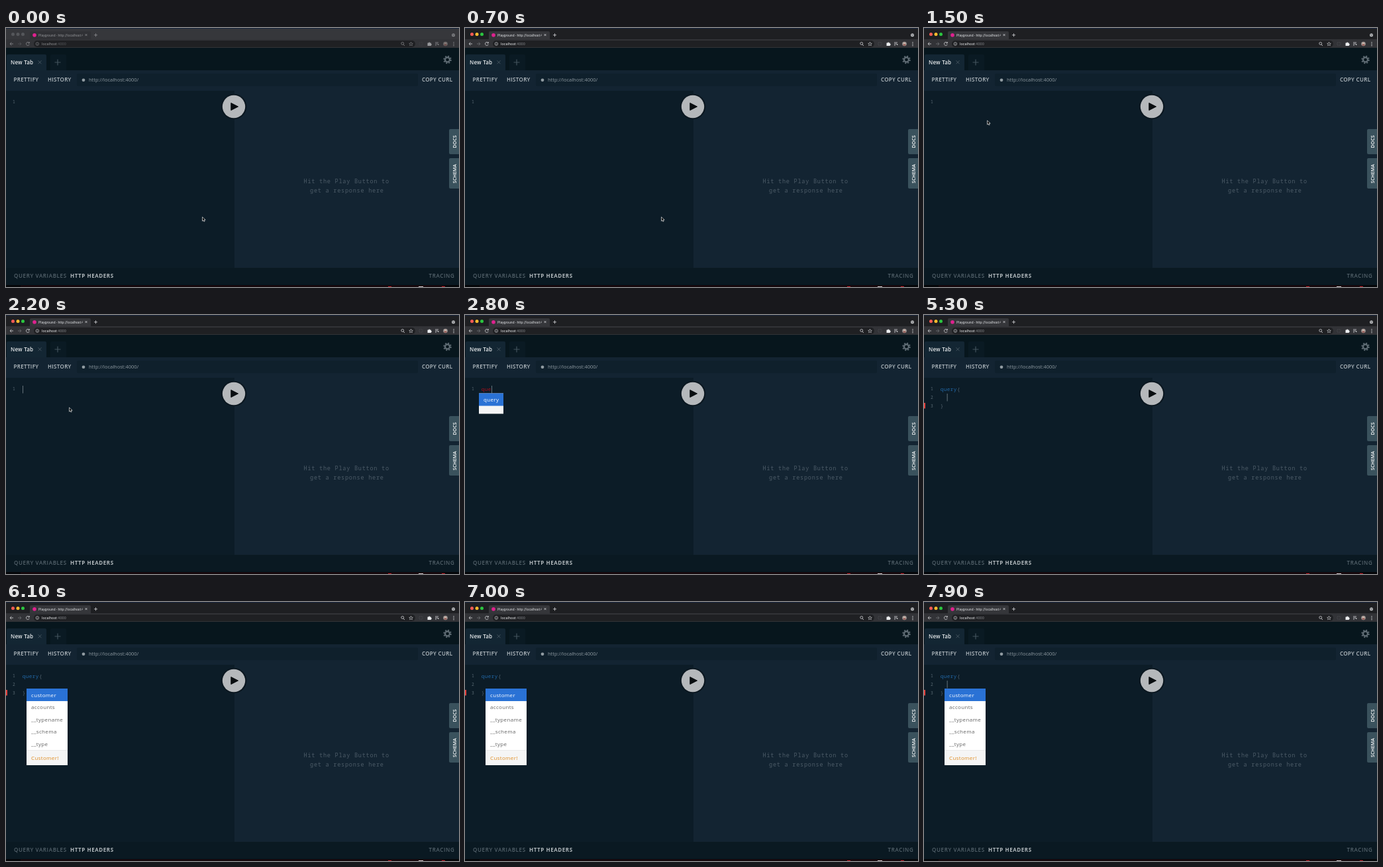
Write an HTML page that moves like this. It is 684 px wide and 392 px high and loops after 8000 ms.

```html
<!DOCTYPE html>
<html lang="en">
<head>
<meta charset="utf-8">
<title>Query playground</title>
<style>
html, body { margin: 0; width: 100%; height: 100%; overflow: hidden; background: #000; }
svg { display: block; }
text { font: 600 8px "Open Sans", sans-serif; letter-spacing: .33px; white-space: pre; }
.bar text { fill: #b9c1c6; }
.foot text { letter-spacing: .66px; }
.foot .current { font-weight: 700; letter-spacing: .57px; }
.chrome text { font: 5.4px Roboto, sans-serif; letter-spacing: .1px; }
.chrome .title { font-size: 5.1px; letter-spacing: 0; }
.icons { fill: none; stroke: #c4c6c9; stroke-width: .9; }
.side text { font-size: 7px; letter-spacing: .1px; fill: #fff; text-anchor: middle; }
.code text { font: 7.5px "Noto Sans Mono", monospace; letter-spacing: .5px; }
.code .num { font-size: 6.3px; fill: #586872; }
.code .brace { fill: #53636e; }
.hint text { font: 8.5px "Noto Sans Mono", monospace; letter-spacing: .78px; fill: #4c5b67; }
.menu text { font-weight: 400; fill: #646464; }
.menu .picked { fill: #fff; }
.idle #strip { fill: #36373b; }
.idle #tab { fill: #303135; }
.idle #lights circle { fill: #55575b; }
.idle .dim { opacity: .55; }
</style>
</head>
<body>
<svg width="684" height="392" viewBox="0 0 684 392">
  <rect width="684" height="392" fill="#132432"/>

  <g class="chrome" id="chrome">
    <rect id="strip" width="684" height="18" fill="#1e1f22"/>
    <rect width="684" height="1" fill="#16243c"/>
    <path id="tab" d="M34 18q2 0 2-2V7q0-2 2-2h88q2 0 2 2v9q0 2 2 2z" fill="#35363a"/>
    <rect y="17" width="684" height="13" fill="#323337"/>
    <rect x="42" y="19" width="576" height="10" rx="5" fill="#1f2023"/>
    <g id="lights">
      <circle cx="10.500" cy="9.500" r="2.500" fill="#fb5b55"/>
      <circle cx="18" cy="9.500" r="2.500" fill="#fcbb2e"/>
      <circle cx="25.500" cy="9.500" r="2.500" fill="#2bc640"/>
    </g>
    <circle cx="43" cy="10.700" r="2.800" fill="#e0218f"/>
    <g class="dim">
      <svg x="49" y="5" width="67" height="12"><text class="title" y="7.500" fill="#dcdee1">Playground - http://localhost:4000</text></svg>
      <text x="54" y="25.800" fill="#e9eaec">localhost<tspan fill="#86898d">:4000</tspan></text>
      <g class="icons">
        <path d="M119.500 9l3 3m0-3l-3 3M133 10.700h5m-2.500-2.500v5"/>
        <path d="M11 24H6m2.300-2.300L6 24l2.300 2.300"/>
        <path d="M18 24h5m-2.300-2.300L23 24l-2.300 2.300" stroke="#696c70"/>
        <path d="M35 22.500a2.500 2.500 0 1 0 .3 2.300M35.300 21v2h-2"/>
        <circle cx="47.300" cy="24" r="2.300" stroke-width=".7"/><path d="M47.300 22.500v.8m0 .5v1.700" stroke-width=".7"/>
        <circle cx="598.700" cy="23.400" r="1.900"/><path d="M600 25l2 2"/>
        <path d="M611.500 21.300l.8 1.900 2 .2-1.500 1.300.5 2-1.800-1.100-1.800 1.100.5-2-1.500-1.300 2-.2z" stroke-width=".7"/>
        <path d="M624 22h5v4h-5z" stroke="#484a4e" stroke-dasharray="1.500 1"/>
        <path d="M648 22h5m-5 2h4m-4 2h2"/>
      </g>
      <path d="M636.500 22.500h1.700a1 1 0 0 1 2 0h1.600v1.500a1 1 0 0 1 0 2v1h-5.300zM652 24l2 1-2 1z" fill="#eceef0"/>
      <circle cx="663.500" cy="24" r="3.300" fill="#a39b98"/>
      <circle cx="663.500" cy="23.200" r="1.300" fill="#d0b0a2"/>
      <path d="M661 26.200a2.600 2 0 0 1 5 0z" fill="#913e3a"/>
      <circle cx="675.500" cy="10.700" r="2.500" fill="#b9bbbe"/>
      <path d="M674.200 10l1.300 1.300 1.300-1.300" fill="none" stroke="#222" stroke-width=".7"/>
      <path d="M676 21.300v6" stroke="#d8dadc" stroke-width="1.200" stroke-dasharray="1.200"/>
    </g>
  </g>

  <g class="bar">
    <rect y="30" width="684" height="34" fill="#07161d"/>
    <path d="M1 64V42q0-2 2-2h56q2 0 2 2v22z" fill="#132633"/>
    <path d="M67 64V42q0-2 2-2h20q2 0 2 2v22z" fill="#0a1a23"/>
    <text x="7" y="54.800" style="letter-spacing:.2px;fill:#e6e9eb">New Tab</text>
    <path d="M48.500 49.300l5 5m0-5l-5 5" stroke="#43535d"/>
    <path d="M73.500 52h9m-4.500-4.500v9" stroke="#44545e" stroke-width="1.200"/>
    <g fill="none" stroke="#5d6a72">
      <circle cx="666.500" cy="48" r="3.500" stroke-width="2.300"/>
      <circle cx="666.500" cy="48" r="5.300" stroke-width="1.900" stroke-dasharray="2.080"/>
    </g>
    <rect x="107" y="69" width="515" height="19" rx="2" fill="#0f202c"/>
    <text x="11.500" y="81.300">PRETTIFY</text>
    <text x="63" y="81.300">HISTORY</text>
    <text x="628" y="81.300">COPY CURL</text>
    <circle cx="117" cy="78.800" r="2.400" fill="#909ba1"/>
    <text x="125" y="81.300" style="font-size:7.500px;font-weight:400;letter-spacing:0;fill:#8f9aa1">http://localhost:4000/</text>
  </g>

  <rect y="95" width="345" height="268" fill="#0c1c27"/>
  <g class="hint">
    <text x="449.500" y="235">Hit the Play Button to</text>
    <text x="459" y="248.500">get a response here</text>
  </g>
  <g class="side">
    <path d="M684 153h-13q-2 0-2 2v34q0 2 2 2h13zM684 197h-13q-2 0-2 2v42q0 2 2 2h13z" fill="#3a525d"/>
    <text transform="translate(679.500 172) rotate(-90)">DOCS</text>
    <text transform="translate(679.500 220.500) rotate(-90)">SCHEMA</text>
  </g>

  <g class="foot">
    <rect y="363" width="684" height="26" fill="#0a1922"/>
    <text x="12" y="378.200" fill="#56646d">QUERY VARIABLES</text>
    <text class="current" x="97" y="378.200" fill="#b0b7bb">HTTP HEADERS</text>
    <text x="638.500" y="378.200" fill="#56646d">TRACING</text>
    <rect y="389" width="684" height="3" fill="#050609"/>
    <path d="M22 390.500h640" stroke="#2c0c12"/>
    <path d="M577 391.500h5M658 391.500h5" stroke="#b8232c"/>
    <path d="M623 391.500h7" stroke="#c9cdd0"/>
  </g>

  <g class="code">
    <rect id="error" width="2" height="8.500" fill="#e8413c"/>
    <text class="num" x="10" y="114">1</text>
    <text id="word" x="24.700" y="115"></text>
    <text id="open" class="brace" x="50" y="115">{</text>
    <g id="block">
      <text class="num" x="10" y="127">2</text>
      <text class="num" x="10" y="139.800">3</text>
      <text class="brace" x="24.700" y="140">}</text>
    </g>
    <rect id="caret" width=".8" height="11.500" fill="#7b8890"/>
  </g>

  <g class="menu" id="keywordMenu">
    <path d="M21 118.500h37v31H21z" fill="#f5f5f5"/>
    <path d="M21 118.500h37v19H21z" fill="#2a72d5"/>
    <text class="picked" x="28" y="131">query</text>
  </g>
  <g class="menu" id="fieldMenu">
    <path d="M31 131h62v116H31z" fill="#fff"/>
    <path d="M31 131h62v19H31z" fill="#2a72d5"/>
    <path d="M31 224.500h62V247H31z" fill="#f5f5f5"/>
    <path d="M31 224.500h62" stroke="#dedede" stroke-width=".6"/>
    <text class="picked" x="38" y="143.500">customer</text>
    <text x="38" y="162">accounts</text>
    <text x="38" y="180.700">__typename</text>
    <text x="38" y="199.300">__schema</text>
    <text x="38" y="218">__type</text>
    <text x="38" y="239" style="fill:#e08d22">Customer!</text>
  </g>

  <circle cx="344" cy="119" r="19.300" fill="#0b1720"/>
  <circle cx="344" cy="119" r="17.200" fill="#b5b8bb"/>
  <path d="M339.800 113.500l10.700 5.500-10.700 5.500z" fill="#090d10" stroke="#090d10" stroke-linejoin="round"/>

  <path id="mouse" d="M0 0v6.200l1.500-1.300.9 2.100 1.200-.5-.9-2.100h2z" fill="#080808" stroke="#e5e7e8" stroke-width=".7"/>
</svg>
<script>
const LOOP = 8000, BLINK = 530;
const ACTIVATE = 700, MOVE_END = 1400, CLICK = 2000;
const KEYS = [2400, 2550, 2750, 3050];
const ACCEPT = 3300, LINT = 3500, BRACE = 4500, ENTER = 5270, SUGGEST = 6000;

const el = id => document.getElementById(id);
const show = (id, on) => el(id).setAttribute("visibility", on ? "visible" : "hidden");
const place = (id, x, y) => el(id).setAttribute("transform", `translate(${x} ${y})`);
const ease = p => p * p * (3 - 2 * p);

function draw(t) {
  el("chrome").classList.toggle("idle", t < ACTIVATE);

  const p = ease(Math.min(1, Math.max(0, (t - ACTIVATE) / (MOVE_END - ACTIVATE))));
  place("mouse", 296.5 - 201 * p, 286 - 146 * p);
  show("mouse", t < KEYS[0]);

  const typed = t >= ACCEPT ? 5 : KEYS.filter(k => t >= k).length;
  el("word").textContent = "query".slice(0, typed);
  el("word").setAttribute("fill", typed < 5 ? "#b30d18" : "#236cae");
  show("open", t >= BRACE);
  show("block", t >= ENTER);
  show("keywordMenu", t >= KEYS[1] && t < ACCEPT);
  show("fieldMenu", t >= SUGGEST);

  show("error", t >= LINT);
  place("error", 0, t < ENTER ? 108 : 133);

  const lastAction = [CLICK, ...KEYS, ACCEPT, BRACE, ENTER].filter(a => t >= a).pop();
  show("caret", t >= CLICK && (t - lastAction) % (2 * BLINK) < BLINK);
  if (t < ENTER) place("caret", 25 + 5 * (typed + (t >= BRACE)), 107);
  else place("caret", 34.7, 119);
}

function tick() {
  draw(performance.now() % LOOP);
  requestAnimationFrame(tick);
}
tick();
</script>
</body>
</html>
```
